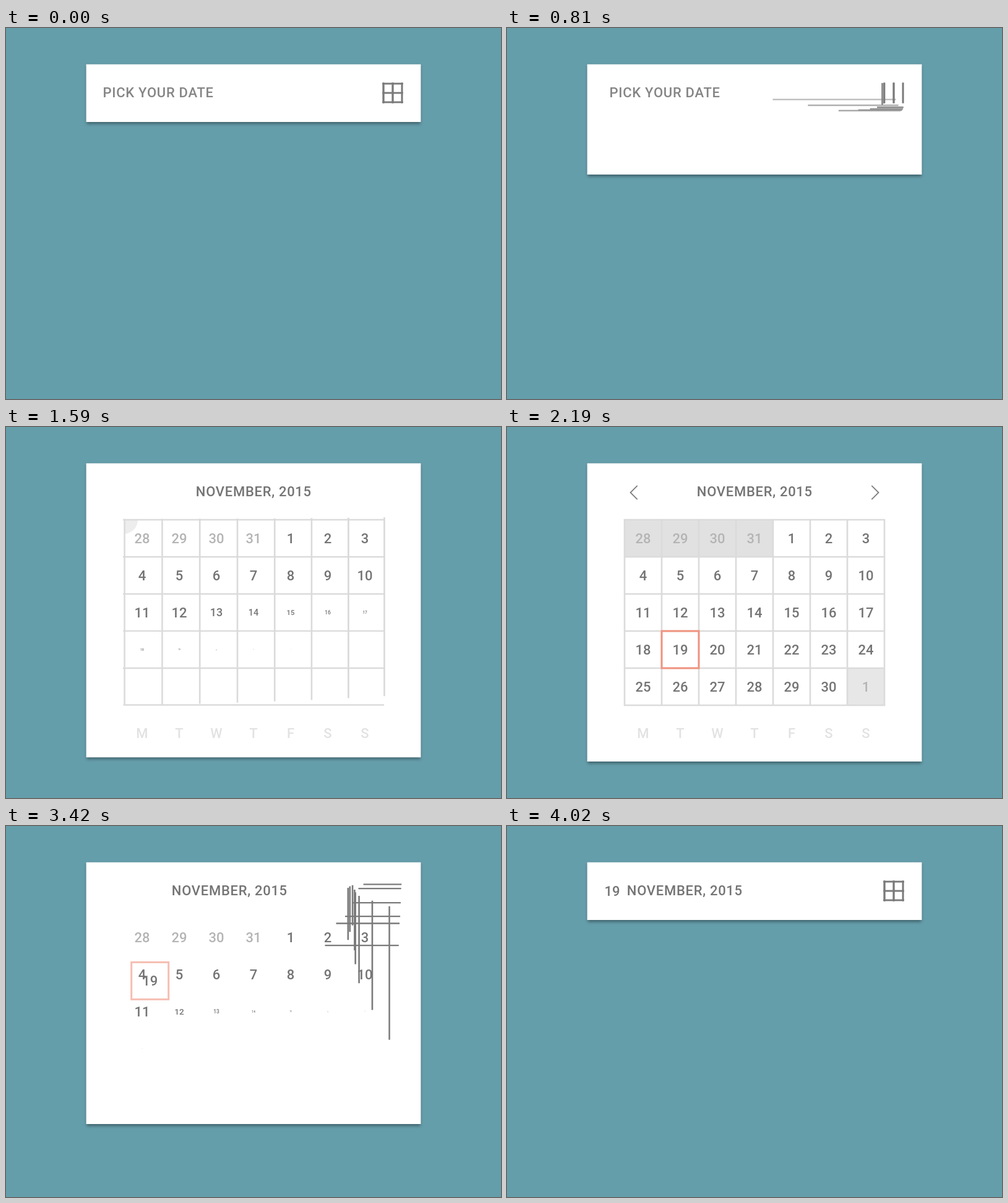
Write an HTML page with a canvas that moves like this. It is 800 by 600 pixels and loops after 4800 ms.

```html
<!DOCTYPE html>
<html lang="en">
<head>
<meta charset="utf-8">
<title>Date picker</title>
<style>
html, body { margin: 0; width: 100%; height: 100%; overflow: hidden; background: #659eab; }
canvas { display: block; }
</style>
</head>
<body>
<canvas id="stage" width="800" height="600"></canvas>
<script>
const ctx = document.getElementById('stage').getContext('2d');
const LOOP = 4800, STEP = 30, CLOSING = 2580;
const LEFT = 190, TOP = 150, CELL = 60;
const INK = '#747474', FAINT = '#b4b4b4';

const clamp = v => Math.max(0, Math.min(1, v));
const mix = (a, b, p) => a + (b - a) * p;
const ramp = (t, a, b) => clamp((t - a) / (b - a));

// Easing along a cubic Bezier with control points (a, 0) and (b, 1).
function bezier(a, b) {
  return x => {
    if (x <= 0) return 0;
    if (x >= 1) return 1;
    let lo = 0, hi = 1;
    for (let i = 0; i < 30; i++) {
      const s = (lo + hi) / 2, r = 1 - s;
      if (3 * a * s * r * r + 3 * b * s * s * r + s * s * s < x) lo = s; else hi = s;
    }
    return lo * lo * (3 - 2 * lo);
  };
}

// Smooth monotone curve through [time, value] points.
function track(...pts) {
  const n = pts.length;
  const rise = i => (pts[i + 1][1] - pts[i][1]) / (pts[i + 1][0] - pts[i][0]);
  const slope = pts.map((_, i) => {
    if (i === 0 || i === n - 1) return 0;
    const a = rise(i - 1), b = rise(i);
    return a * b <= 0 ? 0 : 2 * a * b / (a + b);
  });
  return t => {
    if (t <= pts[0][0]) return pts[0][1];
    if (t >= pts[n - 1][0]) return pts[n - 1][1];
    let i = 0;
    while (t > pts[i + 1][0]) i++;
    const [t0, v0] = pts[i], [t1, v1] = pts[i + 1];
    const h = t1 - t0, u = (t - t0) / h, w = 1 - u;
    return v0 * w * w * (1 + 2 * u) + v1 * u * u * (3 - 2 * u)
      + h * u * w * (slope[i] * w - slope[i + 1] * u);
  };
}

const openEase = bezier(0.4, 0), closeEase = bezier(0.59, 0.09);
const cardBottom = track([600, 152], [720, 172], [810, 237], [960, 394], [1230, 495],
  [1500, 530], [1800, 540], [1950, 541], [2700, 541], [3090, 532], [3420, 482],
  [3630, 359], [3780, 240], [3900, 175], [4020, 152]);
const titleIn = track([660, 0], [810, 0.06], [960, 0.6], [1230, 0.99], [1320, 1]);
const titleOut = track([2800, 0], [3090, 0.044], [3420, 0.345], [3630, 0.72], [3960, 1]);
const pickMove = track([2800, 0], [3090, 0.041], [3420, 0.43], [3630, 0.78], [3960, 1]);
const shadeRadius = track([1500, 0], [1980, 250], [2580, 250], [3090, 36], [3150, 0]);
const arrowFold = track([1590, 1], [1980, 0], [2640, 0], [3090, 0.33], [3300, 1]);

const rowFrom = [90, 90, 105, 120, 105, 120], rowOrder = [0, 1, 2, 4, 3, 5];
const colFrom = [610, 610, 610, 625, 625, 625, 640, 640];

function text(str, x, y, color, align = 'left', alpha = 1, spacing = 0.72) {
  if (alpha <= 0) return;
  ctx.globalAlpha = alpha;
  ctx.font = '500 22px Roboto, sans-serif';
  ctx.letterSpacing = spacing + 'px';
  ctx.textAlign = align;
  ctx.fillStyle = color;
  ctx.fillText(str, x, y + 7.8);
  ctx.globalAlpha = 1;
}

function path(color, width, ...pts) {
  ctx.beginPath();
  pts.forEach(([x, y]) => ctx.lineTo(x, y));
  ctx.strokeStyle = color;
  ctx.lineWidth = width;
  ctx.stroke();
}

function shadeCells(x, y, w, r) {
  if (r <= 0) return;
  ctx.save();
  ctx.beginPath();
  ctx.rect(x + 1, y + 1, w, CELL);
  ctx.clip();
  ctx.globalAlpha = Math.min(1, 0.55 + r / 400);
  ctx.fillStyle = '#e1e1e1';
  ctx.beginPath();
  ctx.arc(x, y, r, 0, 7);
  ctx.fill();
  ctx.restore();
}

function digitScale(t, n) {
  if (t < CLOSING) return clamp((t - 740 - 30 * n) / 400) ** 2.6;
  const s = Math.exp(-Math.max(0, t - 3090 - (26 - n) * 27.5) / 57);
  return s < 0.03 ? 0 : s;
}

function drawDigits(t) {
  for (let n = 0; n < 35; n++) {
    const s = digitScale(t, n);
    if (s <= 0 || (n === 22 && t >= CLOSING)) continue;
    const day = n < 4 ? 28 + n : n < 34 ? n - 3 : 1;
    ctx.save();
    ctx.translate(LEFT + 30 + n % 7 * CELL, TOP + 30 + Math.floor(n / 7) * CELL);
    ctx.scale(s, s);
    text(day, 0, 0, n < 4 || n === 34 ? FAINT : INK, 'center', 1, 0);
    ctx.restore();
  }
}

// How far a line has moved from the icon (0) to the grid (1), and its grey.
function lineState(t, openStart, closeStart, closeTime) {
  if (t < CLOSING) {
    const p = openEase((t - openStart) / 930);
    return [p, mix(122, 219, Math.sqrt(p))];
  }
  const c = closeEase((t - closeStart) / closeTime);
  return [1 - c, mix(219, 122, Math.min(1, 0.75 * Math.sqrt(c / 0.2)))];
}

function drawLines(t) {
  rowFrom.forEach((from, i) => {
    const delay = STEP * rowOrder[i];
    const [p, g] = lineState(t, 573 + delay, 2814 + delay, 930);
    const y = mix(from, TOP + i * CELL, p);
    path(`rgb(${g},${g},${g})`, 2.4, [mix(608.5, 189, p), y], [mix(641.5, 611, p), y]);
  });
  colFrom.forEach((from, i) => {
    const delay = STEP * i;
    const [p, g] = lineState(t, 756 + delay, 2924 + delay, 850);
    const x = mix(from, LEFT + i * CELL, p);
    path(`rgb(${g},${g},${g})`, 2.6, [x, mix(88.5, 149, p)], [x, mix(121.5, 451, p)]);
  });
}

function drawPicked(t) {
  const p = pickMove(t);
  const x = mix(280, 170, p), y = mix(360, 105, p);
  const alpha = t < CLOSING ? ramp(t, 1680, 1980)
    : t < 3420 ? mix(1, 0.6, ramp(t, 3180, 3420)) : mix(0.6, 0, ramp(t, 3420, 3660));
  if (t >= CLOSING) {
    ctx.globalAlpha = 1 - ramp(t, 3120, 3330);
    ctx.fillStyle = '#fff';
    ctx.fillRect(x - 30, y - 30, 60, 60);
  }
  if (alpha > 0) {
    ctx.globalAlpha = alpha;
    ctx.strokeStyle = '#f1937f';
    ctx.lineWidth = 3;
    ctx.strokeRect(x - 30, y - 30, 60, 60);
  }
  ctx.globalAlpha = 1;
  if (t >= CLOSING) text('19', x, y, INK, 'center', 1, 0);
}

function drawTitle(t) {
  const p = titleIn(t), fade = ramp(p, 0.3, 0.7);
  text('PICK YOUR DATE', 156.5 + 150 * p, 104.5, '#858585', 'left', 1 - fade);
  const x = 306.8 - 150 * (1 - p) - 113 * titleOut(t);
  text('NOVEMBER, 2015', x, 104.5, INK, 'left', fade);
}

function drawArrows(t) {
  const q = arrowFold(t);
  if (q >= 1) return;
  const angle = Math.PI / 4 * (1 - q);
  const dx = 15.8 * Math.cos(angle), dy = 15.8 * Math.sin(angle);
  ctx.globalAlpha = 1 - ramp(q, 0.4, 1);
  for (const side of [-1, 1]) {
    const tip = 400 + side * (200.5 + 26 * q), end = tip - side * dx;
    path('#808080', 1.8, [end, 106 - dy], [tip, 106], [end, 106 + dy]);
  }
  ctx.globalAlpha = 1;
}

function draw(t) {
  ctx.fillStyle = '#659eab';
  ctx.fillRect(0, 0, 800, 600);

  const card = [129.6, 58.7, 540.8, cardBottom(t) - 58.7];
  ctx.save();
  ctx.shadowColor = 'rgba(0,0,0,.4)';
  ctx.shadowBlur = 5;
  ctx.shadowOffsetY = 2.5;
  ctx.fillStyle = '#fff';
  ctx.fillRect(...card);
  ctx.restore();

  ctx.save();
  ctx.beginPath();
  ctx.rect(...card);
  ctx.clip();
  const r = shadeRadius(t);
  shadeCells(LEFT, TOP, 4 * CELL, r);
  shadeCells(LEFT + 6 * CELL, TOP + 4 * CELL, CELL, (r - 60) * 0.5);
  [...'MTWTFSS'].forEach((c, i) => text(c, 220 + i * CELL, 495, '#e2e2e2', 'center', 1, 0));
  drawDigits(t);
  drawLines(t);
  drawPicked(t);
  drawTitle(t);
  drawArrows(t);
  ctx.restore();
}

let start;
function tick(now) {
  start ??= now;
  draw(Math.floor((now - start) % LOOP / STEP) * STEP);
  requestAnimationFrame(tick);
}
draw(0);
requestAnimationFrame(tick);
</script>
</body>
</html>
```
